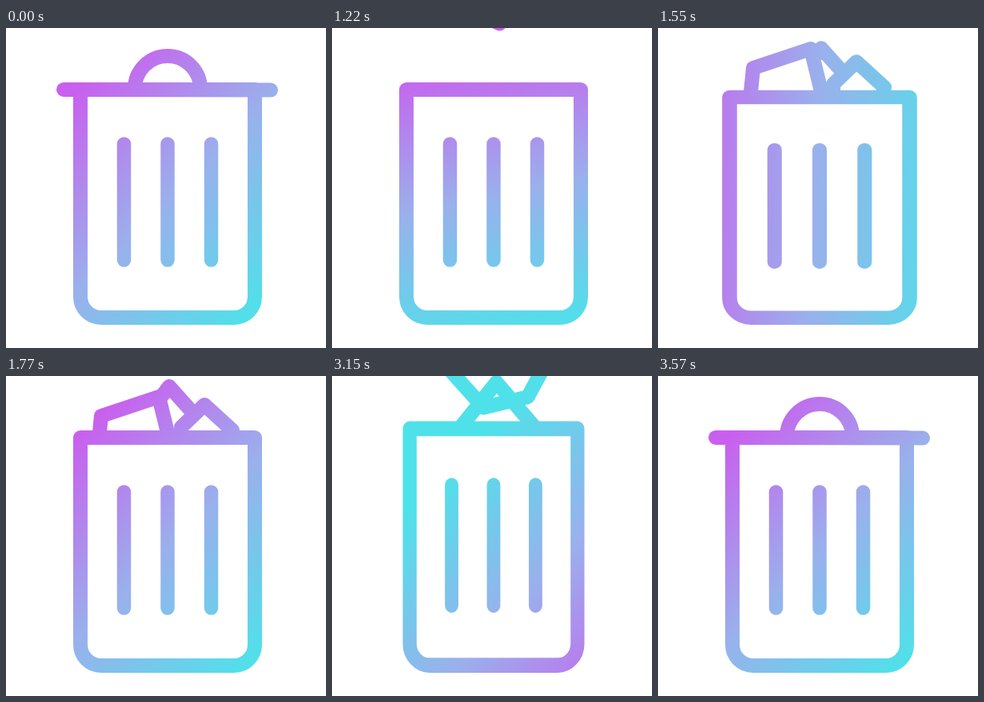
These frames come from a looping animation (400x400 px, 3.6 s). An HTML page with a canvas:

```html
<!DOCTYPE html>
<html lang="en">
<head>
<meta charset="utf-8">
<title>Trash can</title>
<style>
html, body { margin: 0; width: 100%; height: 100%; overflow: hidden; background: #fff; }
canvas { display: block; width: 100vw; height: 100vh; }
</style>
</head>
<body>
<canvas id="stage" width="400" height="400"></canvas>
<script>
const ctx = document.getElementById('stage').getContext('2d');
const LOOP = 3600, FILL_AT = 990, EMPTY_AT = 2790, SPAN = 780;
const FLIGHT = 160, HEIGHT = 230, MOUTH = 207;
const RAD = Math.PI / 180;
const clamp = v => Math.min(1, Math.max(0, v));
const easeInOut = p => p < 0.5 ? 4 * p ** 3 : 1 - 4 * (1 - p) ** 3;

// Resting outlines, back to front; spin is in degrees per pixel of height.
const papers = [
  { enter: 2, leave: 2, spin: 0.3, points: [[204, 13], [256, 71], [206, 124], [161, 70]] },
  { enter: 0, leave: 1, spin: -0.48, points: [[119, 50], [191, 26], [216, 128], [160, 142], [113, 110]] },
  { enter: 1, leave: 0, spin: -1.35, points: [[248, 36], [219, 64], [220, 115], [236, 148], [269, 120], [283, 68]] }
];

// Falls from above, then dips into the can and comes back up.
function dropIn(t) {
  const dip = 19 * Math.sin(Math.PI * clamp((t - FLIGHT) / 170));
  return HEIGHT * (1 - clamp(t / FLIGHT) ** 2) - dip;
}

const flyOut = t => HEIGHT * clamp(t / FLIGHT) ** 2;

function erase() {
  ctx.globalCompositeOperation = 'destination-out';
  ctx.fill();
  ctx.globalCompositeOperation = 'source-over';
}

function paper({ points, spin }, lift) {
  const [cx, cy] = [0, 1].map(c => points.reduce((sum, p) => sum + p[c], 0) / points.length);
  const up = Math.max(0, lift);
  ctx.save();
  ctx.translate(cx + (MOUTH - cx) * clamp(up / 75), cy - lift);
  ctx.rotate(spin * up * RAD);
  ctx.beginPath();
  points.forEach(([x, y]) => ctx.lineTo(x - cx, y - cy));
  ctx.closePath();
  if (lift < 20) erase();
  ctx.stroke();
  ctx.restore();
}

function can(stretch) {
  ctx.save();
  ctx.translate(202, 371);
  ctx.scale(1 - stretch, 1 + stretch);
  ctx.translate(-202, -371);
  ctx.beginPath();
  ctx.moveTo(93, 77);
  ctx.lineTo(311, 77);
  ctx.arcTo(311, 362, 202, 362, 26);
  ctx.arcTo(93, 362, 93, 77, 26);
  ctx.closePath();
  erase();
  ctx.stroke();
  ctx.beginPath();
  for (let i = -1; i <= 1; i++) {
    ctx.moveTo(202 + 54.5 * i, 145);
    ctx.lineTo(202 + 54.5 * i, 290);
  }
  ctx.lineWidth = 17.5;
  ctx.stroke();
  ctx.restore();
}

function lid(open) {
  ctx.save();
  ctx.translate(72 - 85 * open ** 1.7, 77 - 220 * open ** 4);
  ctx.rotate(-70 * open ** 1.45 * RAD);
  ctx.beginPath();
  ctx.moveTo(0, 0);
  ctx.lineTo(259, 0.5);
  ctx.moveTo(89, -1);
  ctx.arc(130, -1, 41, Math.PI, 0);
  ctx.stroke();
  ctx.restore();
}

// Colours everything drawn so far; the gradient slides as it turns.
function tint(turn) {
  const angle = (225 + turn) * RAD;
  const shift = 35 * (1 - Math.cos(turn * RAD));
  const at = d => [202 + d * Math.cos(angle), 215 + d * Math.sin(angle)];
  const g = ctx.createLinearGradient(...at(shift + 180), ...at(shift - 180));
  ['#c95fee', '#9ab0ec', '#4fe1ea'].forEach((color, i) => g.addColorStop(i / 2, color));
  ctx.globalCompositeOperation = 'source-in';
  ctx.fillStyle = g;
  ctx.fillRect(0, 0, 400, 400);
  ctx.globalCompositeOperation = 'destination-over';
  ctx.fillStyle = '#fff';
  ctx.fillRect(0, 0, 400, 400);
  ctx.globalCompositeOperation = 'source-over';
}

function draw(time) {
  const emptying = time >= EMPTY_AT + 30;
  let t = time - (emptying ? EMPTY_AT : FILL_AT);
  if (t < 30) t = 0;
  const wave = Math.sin(2 * Math.PI * clamp((t - (emptying ? 60 : 280)) / 400));

  ctx.clearRect(0, 0, 400, 400);
  ctx.lineWidth = 18;
  ctx.lineCap = ctx.lineJoin = 'round';
  ctx.strokeStyle = ctx.fillStyle = '#000';
  for (const p of papers) {
    paper(p, emptying ? flyOut(t - 175 - 81 * p.leave) : dropIn(t - 135 - 114 * p.enter));
  }
  can((emptying ? -0.038 : 0.034) * wave);
  lid(clamp((emptying ? SPAN - t : t) / 280));
  tint(emptying ? -360 * clamp(t / 640) ** 1.2 : 360 * easeInOut(clamp(t / 810)));
}

const start = performance.now();
function frame() {
  draw((performance.now() - start) % LOOP);
  requestAnimationFrame(frame);
}
frame();
</script>
</body>
</html>
```
